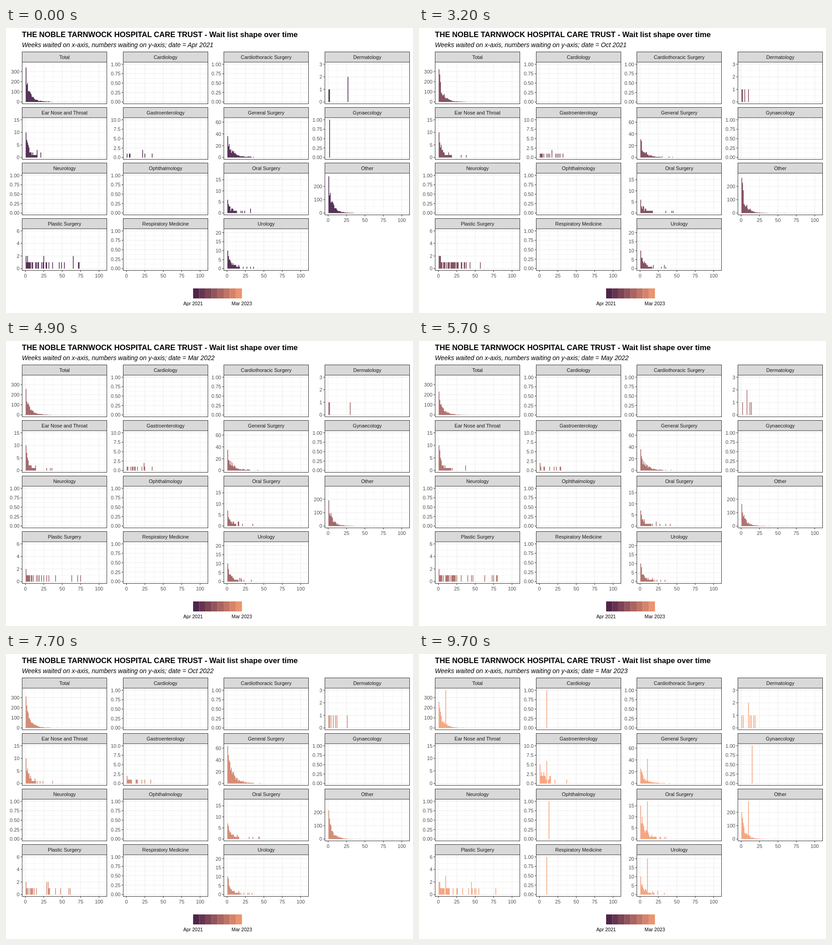
Animation, 894 px wide and 626 px high, one loop 10000 ms. Source, as an HTML page:

```html
<!DOCTYPE html>
<html lang="en">
<head>
<meta charset="utf-8">
<title>Wait list shape over time</title>
<style>
  html, body { margin: 0; width: 100%; height: 100%; overflow: hidden; background: #fff; }
  svg { display: block; width: 894px; height: 626px; font-family: "Liberation Sans", Arial, sans-serif; }
  .title { font-size: 16.63px; font-weight: bold; }
  .sub { font-size: 13.9px; font-style: italic; }
  .strip { font-size: 10.9px; fill: #1a1a1a; text-anchor: middle; }
  .tick { font-size: 10.9px; fill: #4d4d4d; }
  .key { font-size: 10.6px; text-anchor: middle; }
</style>
</head>
<body>
<svg id="stage" viewBox="0 0 894 626"></svg>
<script>
const LOOP = 10000, MONTHS = 24, LAST = MONTHS - 1, WEEKS = 112;
const WEEK = 1.618, ZERO_X = 7, PANEL_W = 186, PANEL_H = 91, PAD = 4.1;
const STRIP_TOP = 52.5, STRIP_H = 22.5, ROW = 122, COL = 221.7;
const NAMES = "Jan Feb Mar Apr May Jun Jul Aug Sep Oct Nov Dec".split(" ");

// peak: [month, new patients] key points; tau: decay in weeks;
// late: expected stragglers, spread over span; backlog: week 10 jump in the last month
const rare = { top: 1, step: .25, digits: 2 };
const PANELS = [
  { name: "Total", top: 373, step: 100 },
  { name: "Cardiology", ...rare, backlog: 1 },
  { name: "Cardiothoracic Surgery", ...rare },
  { name: "Dermatology", top: 3, step: 1, peak: [[0, .8]], tau: 6, late: 1.5, span: [8, 32], backlog: 2 },
  { name: "Ear Nose and Throat", top: 15, step: 5, peak: [[0, 10], [22, 10], [23, 0]], tau: 6, late: 4, span: [13, 40] },
  { name: "Gastroenterology", top: 10, step: 2.5, digits: 1, peak: [[0, 1], [18, 1.5], [23, 5]], tau: 8, late: 4, span: [12, 38], backlog: 6 },
  { name: "General Surgery", top: 64, step: 20, peak: [[0, 36], [6, 31], [14, 37], [18, 64], [23, 25]], tau: 8, late: 5, span: [22, 45], backlog: 42 },
  { name: "Gynaecology", ...rare, late: .4, span: [1, 18] },
  { name: "Neurology", ...rare, late: .1, span: [1, 6] },
  { name: "Ophthalmology", ...rare, late: .4, span: [1, 30] },
  { name: "Oral Surgery", top: 17, step: 5, peak: [[0, 6], [18, 7], [23, 15]], tau: 7, late: 5, span: [14, 45], backlog: 17 },
  { name: "Other", top: 282, step: 100, peak: [[0, 275], [3, 145], [6, 262], [14, 150], [18, 215], [23, 200]], tau: 6, late: 8, span: [20, 60], backlog: 282 },
  { name: "Plastic Surgery", top: 6, step: 2, peak: [[0, 2]], tau: 14, late: 8, span: [22, 80], backlog: 3 },
  { name: "Respiratory Medicine", ...rare, backlog: 1 },
  { name: "Urology", top: 21, step: 5, peak: [[0, 10]], tau: 7, late: 5, span: [16, 36], backlog: 20 }
];

function rng(seed) {
  const next = () => (seed = (seed * 16807) % 2147483647) / 2147483647;
  next();
  next();
  return next;
}

function level(points, i) {
  const k = points.findIndex(p => p[0] >= i);
  if (k < 0) return points[points.length - 1][1];
  if (k === 0) return points[0][1];
  const [a, va] = points[k - 1], [b, vb] = points[k];
  return va + (vb - va) * (i - a) / (b - a);
}

function countsFor(i, p) {
  const { name, top, peak = [[0, 0]], tau = 1, late = 0, span, backlog = 0 } = PANELS[p];
  const rand = rng(7919 * (i + 1) + 104729 * (p + 1));
  const now = level(peak, i), open = peak[0][1] ? now / peak[0][1] : 1;
  const out = Array(WEEKS).fill(0);
  for (let w = 1; w < 60; w++) {
    const mean = now * (.4 * Math.exp(1 - w) + .6 * Math.exp((1 - w) / tau));
    const noise = w > 1 ? .65 + .7 * rand() : 1;
    out[w] = Math.min(top, Math.floor(mean * noise + (now > 5 ? .5 : rand())));
  }
  for (let n = Math.floor(late * Math.min(1, open) + rand()); late && n > 0 && open; n--)
    out[Math.round(span[0] + (span[1] - span[0]) * rand() ** 1.4)]++;
  if (i === LAST) out[10] = Math.max(out[10], backlog);
  // one patient ages through the whole period
  if (name === "Other") out[Math.round(105 - 4.35 * (LAST - i))]++;
  return out;
}

const svg = document.getElementById("stage");
function add(tag, attrs, text) {
  const el = document.createElementNS("http://www.w3.org/2000/svg", tag);
  for (const k in attrs) el.setAttribute(k, attrs[k]);
  if (text !== undefined) el.textContent = text;
  return svg.appendChild(el);
}
const line = (x1, y1, x2, y2, stroke, w = 1) =>
  add("line", { x1, y1, x2, y2, stroke, "stroke-width": w });

const tint = f => {
  const a = [69, 28, 71], b = [246, 156, 115];
  return `rgb(${a.map((v, k) => Math.round(v + (b[k] - v) * f))})`;
};

function place(p) {
  const left = Math.round(COL * (p % 4)) + 35.5;
  const head = STRIP_TOP + ROW * (p >> 2), top = head + STRIP_H, bottom = head + 114;
  return { left, head, top, bottom, x0: left + ZERO_X, y0: bottom - PAD };
}
const unit = p => (PANEL_H - 2 * PAD) / PANELS[p].top;

function drawPanel(p) {
  const { name, top: max, step, digits = 0 } = PANELS[p];
  const { left, head, top, bottom, x0, y0 } = place(p), u = unit(p);
  const right = left + PANEL_W, mid = left + PANEL_W / 2;
  for (const [shift, w] of [[.5, .5], [0, 1]]) {
    for (let y = step * shift; y <= max * 1.049; y += step)
      line(left, y0 - y * u, right, y0 - y * u, "#ebebeb", w);
    for (let x = 25 * shift; x < 110; x += 25)
      line(x0 + x * WEEK, top, x0 + x * WEEK, bottom, "#ebebeb", w);
  }
  const bars = add("path", {});
  add("rect", { x: left, y: head, width: PANEL_W, height: STRIP_H, fill: "#d9d9d9" });
  add("rect", { x: left, y: head, width: PANEL_W, height: bottom - head, fill: "none", stroke: "#333" });
  line(left, top, right, top, "#333");
  add("text", { x: mid, y: head + 15, class: "strip" }, name);
  for (let y = 0; y <= max; y += step) {
    line(left - 3.5, y0 - y * u, left, y0 - y * u, "#333");
    add("text", { x: left - 6, y: y0 - y * u + 4, class: "tick", "text-anchor": "end" }, y.toFixed(digits));
  }
  if (p > 10) for (let x = 0; x <= 100; x += 25) {
    line(x0 + x * WEEK, bottom, x0 + x * WEEK, bottom + 3.5, "#333");
    add("text", { x: x0 + x * WEEK, y: bottom + 15, class: "tick", "text-anchor": "middle" }, x);
  }
  return bars;
}

function barPath(counts, p) {
  const { x0, y0 } = place(p), u = unit(p), w = WEEK * .9;
  return counts.map((n, k) => n
    ? `M${(x0 + k * WEEK - w / 2).toFixed(2)} ${y0}v${(-n * u).toFixed(2)}h${w}V${y0}z` : "").join("");
}

add("text", { x: 35, y: 20, class: "title" }, "THE NOBLE TARNWOCK HOSPITAL CARE TRUST - Wait list shape over time");
const subtitle = add("text", { x: 35, y: 42, class: "sub" });
const bars = PANELS.map((_, p) => drawPanel(p));
for (let k = 0; k < 8; k++)
  add("rect", { x: 411 + k * 13.4, y: 572, width: 13.5, height: 22, fill: tint((k + .5) / 8) });
add("text", { x: 411, y: 609, class: "key" }, "Apr 2021");
add("text", { x: 518, y: 609, class: "key" }, "Mar 2023");

const paths = Array.from({ length: MONTHS }, (_, i) => {
  const all = PANELS.map((_, p) => countsFor(i, p));
  all[0] = all[0].map((_, w) => all.slice(1).reduce((sum, c) => sum + c[w], 0));
  return all.map(barPath);
});

// each month holds, then a 100 ms step leads to the next
const holdEnd = i => i < 4 ? 500 * (i + 1) : 2000 + 400 * (i - 3);

let shown = -1;
function render(t) {
  let i = 0;
  while (i < LAST && t >= holdEnd(i) + 100) i++;
  const pos = i + (t >= holdEnd(i) ? .5 : 0);
  if (pos === shown) return;
  shown = pos;
  const m = i + 3;
  subtitle.textContent = "Weeks waited on x-axis, numbers waiting on y-axis; date = " +
    NAMES[m % 12] + " " + (2021 + Math.floor(m / 12));
  bars.forEach((el, p) => {
    el.setAttribute("d", paths[i][p]);
    el.setAttribute("fill", tint(pos / LAST));
  });
}

const start = performance.now();
function tick(now) {
  render(Math.max(0, now - start) % LOOP);
  requestAnimationFrame(tick);
}
render(0);
requestAnimationFrame(tick);
</script>
</body>
</html>
```
